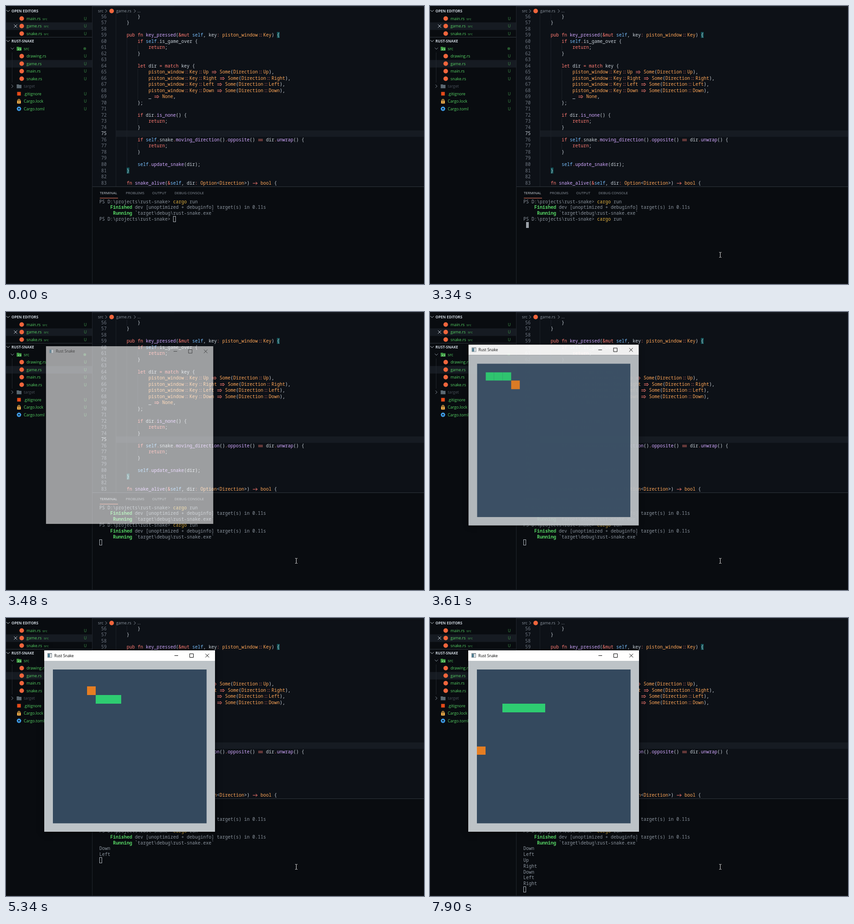
An HTML page with a canvas that plays this animation: 918x610 px, repeating every 8000 ms.

```html
<!DOCTYPE html>
<html lang="en">
<head>
<meta charset="utf-8">
<title>Rust Snake</title>
<style>
html, body { margin: 0; width: 100%; height: 100%; overflow: hidden; background: #090c10; }
canvas { display: block; }
</style>
</head>
<body>
<canvas id="stage" width="918" height="610"></canvas>
<script>
const g = document.getElementById('stage').getContext('2d');
const LOOP = 8000;
const MONO = '"Noto Sans Mono", "DejaVu Sans Mono", monospace';
const SANS = '"Open Sans", "Noto Sans", sans-serif';
const C = {
  dark: '#090c10', editor: '#0d1117', row: '#161b22', line: '#21262d', guide: '#1c2128',
  text: '#c9d1d9', dim: '#8b949e', num: '#6e7681', red: '#ff7b72', blue: '#79c0ff',
  orange: '#ffa657', purple: '#d2a8ff', green: '#56d364', yellow: '#e3b341', rust: '#f0653c'
};

function box(x, y, w, h, color) {
  g.fillStyle = color;
  g.fillRect(x, y, w, h);
}
function text(s, x, y, color, font) {
  g.font = font;
  g.fillStyle = color;
  g.fillText(s, x, y);
}
const sans = (s, x, y, color, size = 8.85, weight = 400) =>
  text(s, x, y, color, `${weight} ${size}px ${SANS}`);
const mono = (s, x, y, color, weight = 400) =>
  text(s, x, y, color, `${weight} 10px ${MONO}`);
function disc(x, y, r, color) {
  g.fillStyle = color;
  g.beginPath();
  g.arc(x, y, r, 0, 7);
  g.fill();
}
// Polylines given as flat lists of coordinates
function stroke(color, width, ...lines) {
  g.strokeStyle = color;
  g.lineWidth = width;
  g.beginPath();
  for (const p of lines)
    for (let i = 0; i < p.length; i += 2) g[i ? 'lineTo' : 'moveTo'](p[i], p[i + 1]);
  g.stroke();
}
function chevron(x, y, open, color = C.text) {
  stroke(color, 1, open ? [x - 3.5, y - 2, x, y + 1.5, x + 3.5, y - 2]
                        : [x - 2, y - 3.5, x + 1.5, y, x - 2, y + 3.5]);
}

// ---- Sidebar ----
const ROW = 16.5;
const rowY = i => 11 + ROW * i;
const icons = {
  rust: (x, y) => disc(x, y, 5, C.rust),
  git: (x, y) => box(x - 4, y - 4, 8, 8, '#e64a19'),
  folder(x, y, color) {
    box(x - 5, y - 4, 5, 2, color);
    box(x - 5, y - 3, 10.5, 7.5, color);
  },
  src(x, y) {
    icons.folder(x, y, '#43a047');
    stroke('#b9f6ca', 1, [x, y, x - 1.5, y + 1.5, x, y + 3], [x + 3, y, x + 4.5, y + 1.5, x + 3, y + 3]);
  },
  target: (x, y) => icons.folder(x, y, '#5c6972'),
  lock(x, y) {
    g.strokeStyle = '#ffb74d';
    g.lineWidth = 1.3;
    g.beginPath();
    g.arc(x, y - 2, 2.3, Math.PI, 0);
    g.stroke();
    box(x - 4, y - 1.5, 8, 6.5, '#ffb74d');
    disc(x, y + 1.7, 1.1, C.dark);
  },
  gear(x, y) {
    for (let i = 0; i < 4; i++) {
      const a = i * Math.PI / 4, c = 5 * Math.cos(a), s = 5 * Math.sin(a);
      stroke('#42a5f5', 2.2, [x - c, y - s, x + c, y + s]);
    }
    disc(x, y, 3.9, '#42a5f5');
    disc(x, y, 1.7, C.dark);
  }
};
// [row, name, icon, left edge of name, folder label x]
const files = [
  [1, 'main.rs', 'rust', 45, 80], [2, 'game.rs', 'rust', 45, 83], [3, 'snake.rs', 'rust', 45, 83],
  [5, 'src', 'src', 39], [6, 'drawing.rs', 'rust', 45], [7, 'game.rs', 'rust', 45],
  [8, 'main.rs', 'rust', 45], [9, 'snake.rs', 'rust', 45], [10, 'target', 'target', 39],
  [11, '.gitignore', 'git', 39], [12, 'Cargo.lock', 'lock', 39], [13, 'Cargo.toml', 'gear', 39]
];

function drawSidebar() {
  box(0, 0, 190, 610, C.dark);
  box(0, rowY(2) - 8, 189, ROW, C.row);
  box(0, rowY(7) - 8, 189, ROW, C.row);
  box(0, 68, 189, 1, '#30363d');
  box(189, 0, 1, 610, C.line);
  box(13, 102, 1, 66, C.line);
  for (const [i, title] of [[0, 'OPEN EDITORS'], [4, 'RUST-SNAKE']]) {
    chevron(4.5, rowY(i), true);
    sans(title, 12, rowY(i) + 2.7, C.text, 8.15, 700);
  }
  chevron(14, rowY(5), true, C.dim);
  chevron(14, rowY(10), false, C.dim);
  stroke(C.text, 1, [17.5, 40.5, 24.5, 47.5], [24.5, 40.5, 17.5, 47.5]);
  for (const [i, name, icon, x, label] of files) {
    const y = rowY(i);
    icons[icon](x - 10.5, y, C.dim);
    sans(name, x, y + 3, icon === 'target' ? '#484f58' : C.green);
    if (label) sans('src', label, y + 3, '#45a854', 8);
    if (icon === 'src') disc(173, y, 3, '#28592f');
    else if (icon !== 'target') sans('U', 171, y + 3, '#40984c', 8.6);
  }
}

// ---- Editor ----
const code = `            }
        }

    pub fn key_pressed(&mut self, key: piston_window::Key) {
        if self.is_game_over {
            return;
        }

        let dir = match key {
            piston_window::Key::Up => Some(Direction::Up),
            piston_window::Key::Right => Some(Direction::Right),
            piston_window::Key::Left => Some(Direction::Left),
            piston_window::Key::Down => Some(Direction::Down),
            _ => None,
        };

        if dir.is_none() {
            return;
        }

        if self.snake.moving_direction().opposite() == dir.unwrap() {
            return;
        }

        self.update_snake(dir);
    }

    fn snake_alive(&self, dir: Option<Direction>) -> bool {`.split('\n');
code[0] = '        }';
code[1] = '    }';
const tokens = /=>|==|->|::|\w+|\S/g;

function tokenColor(s, next) {
  if (/^(pub|fn|if|return|let|match|mut|=>|==|->|::|[&.:=])$/.test(s)) return C.red;
  if (s === 'self') return C.blue;
  if (/^([A-Z]\w*|piston_window|bool)$/.test(s)) return C.orange;
  return /^[a-z]/.test(s) && next === '(' ? C.purple : C.text;
}
function drawToken(s, x, y, color) {
  const m = y - 3.5;
  if (s === '::') {
    mono(':', x + 1.2, y, color);
    mono(':', x + 4.8, y, color);
  } else if (s === '==') {
    stroke(color, 1, [x + 1, m - 1, x + 11, m - 1], [x + 1, m + 2, x + 11, m + 2]);
  } else if (s === '=>') {
    stroke(color, 1, [x + 1, m - 1, x + 9, m - 1], [x + 1, m + 2, x + 9, m + 2],
      [x + 7.5, m - 2.8, x + 11, m + .5, x + 7.5, m + 3.8]);
  } else if (s === '->') {
    stroke(color, 1, [x + 1, m + .5, x + 11, m + .5], [x + 7.5, m - 2.5, x + 11, m + .5, x + 7.5, m + 3.5]);
  } else mono(s, x, y, color);
}

function drawEditor() {
  box(190, 0, 728, 396, C.editor);
  box(370, 0, 548, 1, C.dark);
  box(190, 1, 728, 1, C.line);
  sans('src', 202, 14, C.dim);
  chevron(220, 11, false, C.dim);
  icons.rust(232, 11);
  sans('game.rs', 242, 14, C.dim);
  chevron(283, 11, false, C.dim);
  sans('...', 288.5, 14, C.dim);

  box(241, 273, 677, 14, C.row);
  box(595, 57, 6, 13, '#105358');
  box(265, 354.5, 6, 13, '#105358');
  code.forEach((src, i) => {
    const n = 56 + i, y = Math.round(26.5 + 13.52 * i);
    const indent = src ? src.search(/\S/) : n > 60 && n < 81 ? 8 : 4;
    for (let c = 0; c < indent; c += 4) box(241 + 6 * c, y - 10, 1, 14, C.guide);
    mono(n, 209, y, n === 75 ? C.text : C.num);
    for (const m of src.matchAll(tokens))
      drawToken(m[0], 241 + 6 * m.index, y, tokenColor(m[0], src[m.index + m[0].length]));
  });
}

// ---- Terminal ----
const keys = [[4740, 'Down'], [4940, 'Left'], [5610, 'Up'], [5890, 'Right'],
  [6560, 'Down'], [7100, 'Left'], [7900, 'Right']];
const term = (s, line, col, color = C.dim, weight) =>
  mono(s, 205 + 6 * col, Math.round(432.5 + 12.8 * line), color, weight);

function prompt(line, typed) {
  term('PS D:\\projects\\rust-snake>', line, 0);
  term(typed.slice(0, 5), line, 27, C.yellow);
  term(typed.slice(6), line, 33);
}
function build(line) {
  term('Finished', line, 4, C.green, 700);
  term('dev [unoptimized + debuginfo] target(s) in 0.11s', line, 13);
  term('Running', line + 1, 5, C.green, 700);
  term('`target\\debug\\rust-snake.exe`', line + 1, 13);
}
function typedCount(t) {
  if (t < 1990) return 0;
  if (t < 2810) return Math.min(6, Math.floor((t - 1990) / 95.7));
  return Math.min(9, 7 + Math.floor((t - 2810) / 110));
}

function drawTerminal(t) {
  box(190, 396, 728, 214, C.dark);
  box(190, 396, 728, 1, '#30363d');
  [['TERMINAL', 206], ['PROBLEMS', 263], ['OUTPUT', 321], ['DEBUG CONSOLE', 370]]
    .forEach(([s, x], i) => sans(s, x, 413, i ? C.dim : C.text, 7.9));
  box(206, 421, 40, 1, '#f78166');
  prompt(0, 'cargo run');
  build(1);
  const n = typedCount(t);
  prompt(3, 'cargo run'.slice(0, n));
  let line = 3, col = 27 + n;
  if (t >= 3140) [line, col] = [4, t < 3340 ? 0 : 1];
  if (t >= 3410) {
    build(4);
    const log = keys.filter(k => k[0] <= t);
    log.forEach((k, i) => term(k[1], 6 + i, 0));
    [line, col] = [6 + log.length, 0];
  }
  if (t >= 1990 && t < 2060) return;
  const x = 205 + 6 * col, y = Math.round(461 + 12.8 * (line - 3));
  if (t >= 670 && t < 3410) box(x, y, 6, 13, '#9ba1a8');
  else {
    g.strokeStyle = '#b1b7bd';
    g.lineWidth = 1;
    g.strokeRect(x + .5, y + .5, 5, 12);
  }
}

// ---- Game window ----
const CELL = 18.75;
const step = { R: [1, 0], L: [-1, 0], U: [0, -1], D: [0, 1] };
const moves = [[3750, 'R'], [3950, 'R'], [4210, 'R'], [4410, 'R'], [4610, 'R'], [4740, 'D'],
  [4940, 'DL'], [5140, 'L'], [5340, 'L'], [5540, 'L'], [5610, 'U'], [5810, 'U'],
  [5890, 'R'], [6090, 'R'], [6290, 'R'], [6490, 'R'], [6560, 'D'], [6760, 'D'],
  [7030, 'D'], [7100, 'L'], [7300, 'L'], [7500, 'L'], [7700, 'L'], [7900, 'L']];
const openTimes = [3410, 3480, 3540, 3610, 3680, 3750];

function cells(list, color) {
  g.fillStyle = color;
  for (const [c, r] of list) {
    const x = Math.round(84 + c * CELL), y = Math.round(94 + r * CELL);
    g.fillRect(x, y, Math.round(84 + (c + 1) * CELL) - x, Math.round(94 + (r + 1) * CELL) - y);
  }
}
function drawGame(t) {
  box(84, 94, 375, 375, '#bdc3c7');
  box(103, 113, 337.5, 337.5, '#34495e');
  const path = [[2, 2], [3, 2], [4, 2]];
  for (const [at, dirs] of moves) {
    if (at > t) break;
    for (const d of dirs) {
      const [x, y] = path[path.length - 1];
      path.push([x + step[d][0], y + step[d][1]]);
    }
  }
  const eaten = (t >= 5610) + (t >= 6490);
  cells([[[5, 3], [9, 2], [1, 10]][eaten]], '#e67e22');
  cells(path.slice(-3 - eaten), '#2ecc71');
}
function drawWindow(t) {
  const held = openTimes.filter(v => v <= t).pop();
  if (!held) return;
  const left = 1 - Math.min(1, (held - 3360) / 333);
  const alpha = 1 - left * left, scale = 1 - .05 * (1 - alpha);
  g.save();
  g.translate(271.5, 270);
  g.scale(scale, scale);
  g.translate(-271.5, -270);
  g.globalAlpha = alpha;
  // Shadow only outside the frame
  g.save();
  g.beginPath();
  g.rect(0, 0, 918, 610);
  g.rect(84, 71, 375, 398);
  g.clip('evenodd');
  g.shadowColor = 'rgba(0,0,0,.5)';
  g.shadowBlur = 12;
  g.shadowOffsetY = 2;
  box(84, 71, 375, 398, '#000');
  g.restore();

  if (t < 3540) box(84, 71, 375, 398, '#fff');
  else {
    box(84, 71, 375, 23, '#fff');
    drawGame(t);
  }
  box(91, 77, 10, 10, '#8a9299');
  box(92, 79, 4, 7, '#4d7f93');
  box(96.5, 79, 3.5, 7, '#e4e8ea');
  sans('Rust Snake', 106, 85.7, '#000', 8.4);
  stroke('#000', 1, [370, 82.5, 378, 82.5], [403.5, 78.5, 411.5, 78.5, 411.5, 86.5, 403.5, 86.5, 403.5, 78],
    [438, 78.5, 446, 86.5], [446, 78.5, 438, 86.5]);
  g.restore();
}

function drawPointer(t) {
  if (t < 340) return;
  const u = Math.min(1, Math.floor((t - 340) / 66) / 5), far = (1 - u) ** 2;
  const x = Math.round(637 + 88 * far) + .5, y = Math.round(546 + 58 * far);
  stroke('#e6e6e6', 1, [x, y - 5, x, y + 5],
    [x - 2.5, y - 5.5, x - .5, y - 5.5], [x + .5, y - 5.5, x + 2.5, y - 5.5],
    [x - 2.5, y + 5.5, x - .5, y + 5.5], [x + .5, y + 5.5, x + 2.5, y + 5.5]);
}

function frame() {
  const t = performance.now() % LOOP;
  drawEditor();
  drawTerminal(t);
  drawSidebar();
  box(0, 609, 918, 1, '#14181d');
  drawWindow(t);
  drawPointer(t);
  requestAnimationFrame(frame);
}
frame();
</script>
</body>
</html>
```
